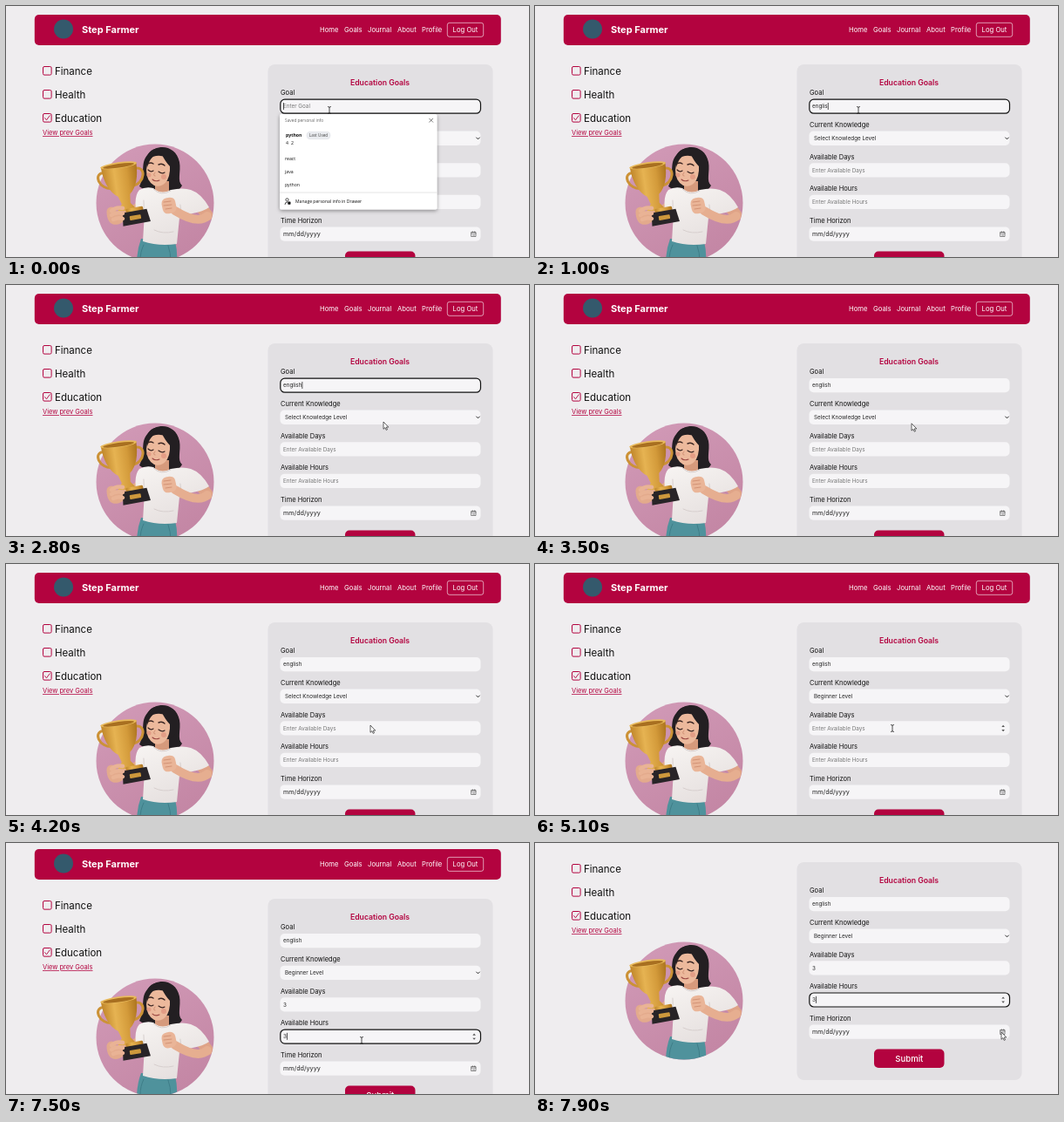
An HTML page that plays this animation: 600x288 px, repeating every 8000 ms.

```html
<!DOCTYPE html>
<html lang="en">
<head>
<meta charset="utf-8">
<style>
html, body { margin: 0; width: 100%; height: 100%; overflow: hidden; background: #efedef; }
svg { display: block; width: 600px; height: 288px; font-family: Inter, sans-serif; }
.red { fill: #b3033f; }
.nav { font-size: 7.7px; fill: #fff; }
.option { font-size: 11.5px; fill: #111; }
.label { font-size: 7.5px; fill: #111; }
.value { font-size: 6.3px; fill: #222; }
.hint { fill: #777; }
.line { fill: none; stroke-linecap: round; stroke-linejoin: round; }
#popup { font-family: "Open Sans", sans-serif; font-size: 5.2px; fill: #111; }
</style>
</head>
<body>
<svg viewBox="0 0 600 288">
  <defs>
    <linearGradient id="pink" x2="0.6" y2="1"><stop stop-color="#d29bb8"/><stop offset="1" stop-color="#c487a5"/></linearGradient>
    <linearGradient id="gold"><stop stop-color="#c0862a"/><stop offset=".35" stop-color="#e6b352"/><stop offset=".7" stop-color="#d39a3a"/><stop offset="1" stop-color="#ac741f"/></linearGradient>
    <linearGradient id="cloth" x2="0.5" y2="1"><stop stop-color="#f7f4f2"/><stop offset="1" stop-color="#e6e0df"/></linearGradient>
    <clipPath id="bust"><circle cx="171" cy="226" r="67.5"/><rect x="95" y="150" width="150" height="86"/></clipPath>
    <filter id="shadow" x="-10%" y="-10%" width="120%" height="125%"><feDropShadow dx="0" dy="1.5" stdDeviation="2" flood-opacity=".4"/></filter>
  </defs>
  <rect width="600" height="288" fill="#efedef"/>

  <g id="page">
    <rect class="red" x="32.800" y="10" width="535" height="35" rx="5"/>
    <circle cx="66" cy="26.500" r="11" fill="#34596c"/>
    <text x="87" y="31" font-size="11" font-weight="700" fill="#fff">Step Farmer</text>
    <g id="nav" class="nav"></g>
    <rect x="506.300" y="19.300" width="41.400" height="16" rx="2.500" fill="none" stroke="#fff" stroke-width=".6"/>
    <text class="nav" x="527" y="30.300" text-anchor="middle">Log Out</text>

    <g id="options"></g>
    <path d="M44.500 128.500l2 2.300 3.700-5" class="line" stroke="#b3033f" stroke-width=".9"/>
    <text class="red" x="42" y="148" font-size="7.500" text-decoration="underline">View prev Goals</text>

    <circle cx="171" cy="226" r="67.500" fill="url(#pink)"/>
    <g clip-path="url(#bust)">
      <path d="M155 267L194 270Q197 282 196 296H150Q150 280 155 267Z" fill="#4f929c"/>
      <path d="M158 274q-4 8-4 18M186 275q3 8 3 18" class="line" stroke="#3f7d88"/>
      <path d="M163 170C153 181 161 190 153 207C160 213 168 212 177 211L189 213C196 213 199 211 202 206C196 201 201 190 199 179C195 160 174 157 163 170Z" fill="#231f22"/>
      <path d="M171 201h16v14q-9 5-16 0Z" fill="#d69a7c"/>
      <path d="M152 231L128 245Q121 247 121 236" class="line" stroke="#e3aa8c" stroke-width="11"/>
      <path d="M220 226L231 240" class="line" stroke="#dfa387" stroke-width="13"/>
      <path d="M169 209Q178 217 189 211Q203 208 212 211Q224 215 233 231Q226 236 214 238L199 243L196 273Q175 276 157 270L159 237L149 233Q147 218 153 211Q160 207 169 209Z" fill="url(#cloth)"/>
      <path d="M158 223q1 8-1 14M200 228q2 8-1 16M170 257q10 5 22 2M169 210q9 9 20 2" class="line" stroke="#d6cecd" stroke-width="1"/>
      <path d="M231 241Q220 251 194 235" class="line" stroke="#e6ae90" stroke-width="10"/>
      <rect x="179" y="220" width="16" height="18" rx="6" fill="#eab598" transform="rotate(-12 187 229)"/>
      <path d="M181 225l8-1M181 229l9-1M183 233l7-1" class="line" stroke="#d08f72" stroke-width=".9"/>
      <path d="M163 176Q174 168 187 175Q190 190 185 200Q179 209 170 206Q161 201 161 188Z" fill="#ecb99c"/>
      <path d="M162 185Q166 170 178 169Q183 179 188 184L188 201Q197 196 198 182Q194 163 177 163Q164 163 161 175Z" fill="#231f22"/>
      <path d="M163 181q3-2 6 0M175 182q4-2 7 1" class="line" stroke="#3b2623" stroke-width="1.400"/>
      <path d="M163 188q3 3 6 1M175 190q4 3 7 1" class="line" stroke="#3b2623" stroke-width="1.200"/>
      <circle cx="164" cy="194" r="2.500" fill="#e39d86"/><circle cx="181" cy="196" r="3" fill="#e39d86"/>
      <path d="M168 199q3 3 8 1" class="line" stroke="#9c4944" stroke-width="1.100"/>
      <path d="M171 191q-3 4 0 4" class="line" stroke="#cf9074" stroke-width="1"/>
      <g transform="translate(3 2) rotate(-8 130 205)">
        <path d="M113 187C98 184 103 206 120 206M147 187C161 184 158 206 141 206" class="line" stroke="#cc9236" stroke-width="3"/>
        <path d="M109 180H150Q150 205 138 215L137 225L143 233H121L127 225L124 216Q110 206 109 180Z" fill="url(#gold)"/>
        <ellipse cx="129.500" cy="180.500" rx="21" ry="3.500" fill="#e8ba5c"/>
        <ellipse cx="129.500" cy="181" rx="18" ry="2.300" fill="#a86f20"/>
      </g>
      <g transform="rotate(-10 149 243)">
        <rect x="139" y="231" width="20" height="5" rx="1.500" fill="url(#gold)"/>
        <path d="M135 235H163L165 250H133Z" fill="#282427"/>
        <rect x="142" y="240" width="13" height="5" rx="1" fill="#cd983c"/>
      </g>
      <path d="M121 235q6-5 13-3M121 240q6-4 13-2M123 245q6-3 11-1" class="line" stroke="#e9b395" stroke-width="4.500"/>
    </g>

    <rect x="300.500" y="67" width="258" height="250" rx="8" fill="#e2e0e3"/>
    <text class="red" x="429" y="90.500" font-size="8.700" font-weight="600" text-anchor="middle">Education Goals</text>
    <g id="fields"></g>
    <path d="M539.700 151l1.800 1.800 1.800-1.800" class="line" stroke="#222" stroke-width="1"/>
    <path d="M534 259.500h5v5h-5ZM534 261h5M535.300 258.700v1M537.700 258.700v1M535.500 263h2" class="line" stroke="#444" stroke-width=".6"/>
    <rect id="ring" x="314.800" width="229.700" height="16" rx="5" fill="none" stroke="#111" stroke-width="1.200"/>
    <rect id="caret" width=".7" height="8" fill="#111"/>
    <rect class="red" x="389" y="281.500" width="80.500" height="21.500" rx="5"/>
    <text x="429.300" y="296" font-size="9.600" font-weight="500" fill="#fff" text-anchor="middle">Submit</text>

    <g id="popup">
      <rect x="314" y="124" width="180.500" height="109.500" rx="2" fill="#fff" filter="url(#shadow)"/>
      <text x="320" y="133.300" font-size="4.800" fill="#666">Saved personal info</text>
      <path d="M485.700 129.200l4 4m0-4l-4 4" class="line" stroke="#444" stroke-width=".7"/>
      <text x="321" y="150" font-weight="700">python</text>
      <rect x="344.500" y="143.700" width="28" height="9.500" rx="4.500" fill="#e9ebef"/>
      <text x="358.500" y="150.200" font-size="4.700" text-anchor="middle" fill="#444">Last Used</text>
      <text x="321" y="159">4</text><text x="327" y="159">2</text>
      <text x="320" y="176.500">react</text>
      <text x="320" y="192">java</text>
      <text x="320" y="207">python</text>
      <path d="M314 214h180.500" stroke="#ddd" stroke-width=".8"/>
      <circle cx="322.500" cy="222.300" r="1.600" fill="none" stroke="#222" stroke-width=".8"/>
      <path d="M320 227.500q0-2.700 3-2.700" class="line" stroke="#222" stroke-width=".8"/>
      <rect x="323.300" y="224.500" width="3.200" height="3.200" rx=".6"/>
      <text x="332" y="226.300" font-size="5.100">Manage personal info in Drawer</text>
    </g>
  </g>

  <path id="arrow" d="M0 0V8.300L1.900 6.600L3.200 9.400L4.500 8.800L3.200 6.100H5.800Z" fill="#fff" stroke="#222" stroke-width=".7"/>
  <path id="beam" d="M-1.500 -3.500Q0 -3.500 0 -2.500Q0 -3.500 1.500 -3.500M0 -2.500V3.500M-1.500 4.500Q0 4.500 0 3.500Q0 4.500 1.500 4.500" class="line" stroke="#222" stroke-width=".8"/>
</svg>
<script>
const LOOP = 8000, BLINK = 530;
const $ = id => document.getElementById(id);
const rowTop = i => 107 + i * 36.6;
const show = (el, on) => el.setAttribute('visibility', on ? 'visible' : 'hidden');
const place = (el, x, y) => el.setAttribute('transform', `translate(${x} ${y})`);

$('nav').innerHTML = [['Home', 360], ['Goals', 388], ['Journal', 415], ['About', 449], ['Profile', 477]]
  .map(([name, x]) => `<text x="${x}" y="30.3">${name}</text>`).join('');

$('options').innerHTML = ['Finance', 'Health', 'Education'].map((name, i) => `
  <rect x="42.500" y="${69.500 + i * 27}" width="9.600" height="9.600" rx="1.500" fill="none" stroke="#b3033f"/>
  <text class="option" x="56" y="${78.500 + i * 27}">${name}</text>`).join('');

const labels = ['Goal', 'Current Knowledge', 'Available Days', 'Available Hours', 'Time Horizon'];
$('fields').innerHTML = labels.map((name, i) => {
  const y = rowTop(i);
  return `<text class="label" x="315" y="${y - 4.700}">${name}</text>
    <rect x="314.500" y="${y}" width="230" height="16.300" rx="5" fill="#f6f5f7"/>
    <text id="value${i}" class="value" x="${i === 1 ? 320 : 318}" y="${y + 10.400}"></text>
    <path id="spin${i}" visibility="hidden" d="M535.300 ${y + 6.800}l1.800-2.200 1.800 2.200ZM535.300 ${y + 9.800}l1.800 2.200 1.800-2.200Z" fill="#555"/>`;
}).join('');
const values = labels.map((_, i) => $('value' + i));
values[4].style.fontSize = '7.2px';

const keyTimes = [200, 350, 500, 650, 800, 950, 1250];
const daysKey = 5900, hoursKey = 7380;
const focusSpans = [[0, 3000, 0], [5200, 6600, 2], [6600, LOOP, 3]];
const caretResets = [0, ...keyTimes, 5200, daysKey, 6600, hoursKey];
const mousePath = [
  [0, 371, 119], [1900, 371, 119], [2600, 433, 157], [3400, 433, 157], [4050, 418, 185], [4500, 418, 185],
  [5000, 410, 188], [5500, 410, 188], [6000, 409, 221], [7200, 409, 221], [7350, 408, 226],
  [7550, 408, 226], [7850, 535, 217], [LOOP, 535, 217]
];

const ease = u => { u = Math.max(0, Math.min(1, u)); return u * u * (3 - 2 * u); };

function mouseAt(t) {
  const i = mousePath.findIndex(p => p[0] > t);
  const [t0, x0, y0] = mousePath[i - 1], [t1, x1, y1] = mousePath[i];
  const k = ease((t - t0) / (t1 - t0));
  return [x0 + (x1 - x0) * k, y0 + (y1 - y0) * k];
}

function setValue(i, text, hint) {
  values[i].textContent = text || hint;
  values[i].classList.toggle('hint', !text);
}

function draw(t) {
  const scroll = 45 * ease((t - 7464) / 236);
  const [mx, my] = mouseAt(t);
  place($('page'), 0, -scroll);

  const typed = 'english'.slice(0, keyTimes.filter(k => k <= t).length);
  const entries = [typed, '', t >= daysKey ? '3' : '', t >= hoursKey ? '3' : '', ''];
  setValue(0, typed, 'Enter Goal');
  setValue(1, t < 4400 ? 'Select Knowledge Level' : 'Beginner Level');
  setValue(2, entries[2], 'Enter Available Days');
  setValue(3, entries[3], 'Enter Available Hours');
  setValue(4, 'mm/dd/yyyy');
  show($('popup'), t < keyTimes[0]);

  const span = focusSpans.find(([from, to]) => t >= from && t < to);
  const focus = span ? span[2] : -1;
  const since = t - Math.max(...caretResets.filter(r => r <= t));
  show($('ring'), span);
  show($('caret'), span && Math.floor(since / BLINK) % 2 === 0);
  if (span) {
    const width = entries[focus] ? values[focus].getComputedTextLength() : 0;
    $('ring').setAttribute('y', rowTop(focus) + .2);
    place($('caret'), 318 + width + .2, rowTop(focus) + 4);
  }

  const arrow = t > 2150 && t < 4700 || t > 7650;
  for (const i of [2, 3]) {
    const dy = my + scroll - rowTop(i);
    show($('spin' + i), focus === i || !arrow && dy > 0 && dy < 16.5);
  }
  show($('arrow'), arrow);
  show($('beam'), !arrow);
  place($(arrow ? 'arrow' : 'beam'), mx, my);
}

const start = performance.now();
function tick() {
  draw((performance.now() - start) % LOOP);
  requestAnimationFrame(tick);
}
tick();
</script>
</body>
</html>
```
